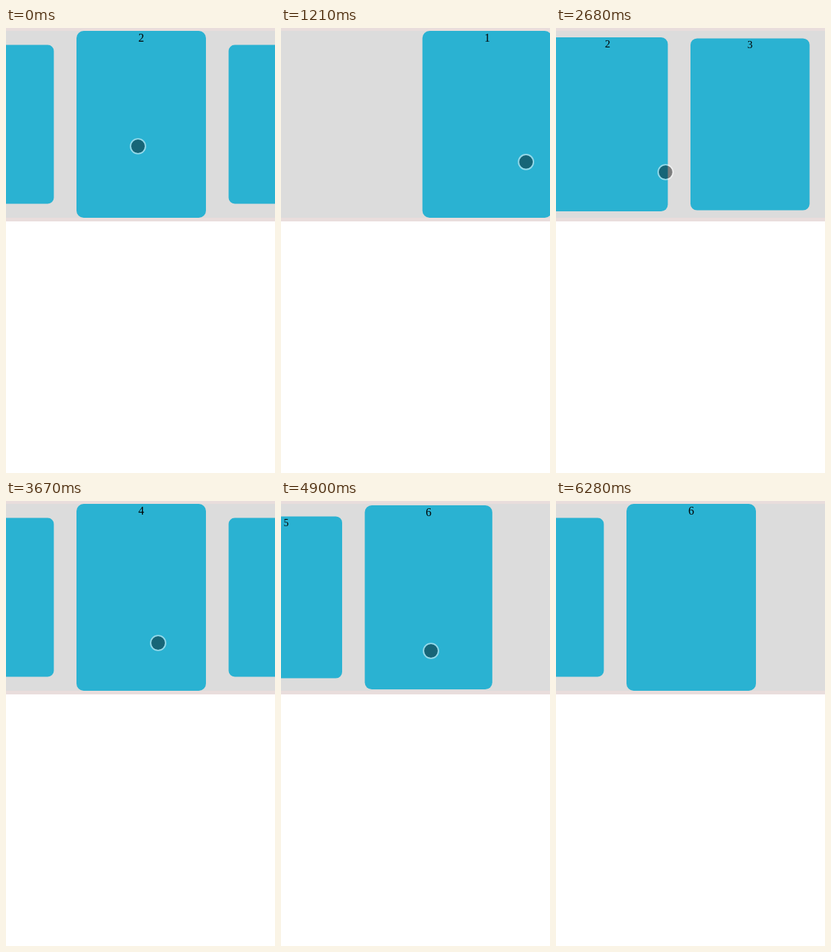
Recreate the animation shown at these times as an HTML page with a canvas. Size 374x619 px, loop 6980 ms.

```html
<!DOCTYPE html>
<html lang="en">
<head>
<meta charset="utf-8">
<title>Card carousel</title>
<style>
  html, body { margin: 0; width: 100%; height: 100%; overflow: hidden; background: #fff; }
  canvas { display: block; width: 374px; height: 619px; }
</style>
</head>
<body>
<canvas id="stage"></canvas>
<script>
const W = 374, H = 619, LOOP = 6980;
const CARD_W = 180, CARD_H = 260, GAP = 198, MID_X = 188, MID_Y = 134, CARDS = 6;
const SNAP = 350, GLIDE_DELAY = 230;
const FIRST_CARD = 2, START_Y = 164.5;
const EXIT = { time: 6280, x: 354, y: 634, bendY: 260 };

// Press time, drag duration, press x, drag distance, y at release
const swipes = [
  [370, 170, 183.5, 58.5, 177],
  [1070, 230, 242, 116, 188],
  [1840, 82, 210.5, -47, 198],
  [2450, 134, 197, -44.6, 200.5],
  [3260, 60, 258, -46.5, 197.5],
  [3980, 100, 211.5, -46, 200],
  [4620, 63, 235, -26.5, 208.5],
  [5350, 250, 238, -98, 228]
].map(([press, ms, x, dx, y]) => ({ press, ms, release: press + ms, x, dx, y }));

// Each swipe moves one card, and stops at either end of the row
let card = FIRST_CARD, lastY = START_Y;
for (const s of swipes) {
  s.from = card;
  s.to = card = Math.min(CARDS, Math.max(1, card - Math.sign(s.dx)));
  s.startY = lastY;
  lastY = s.y;
}

const canvas = document.getElementById('stage');
const ctx = canvas.getContext('2d');
const dpr = window.devicePixelRatio || 1;
canvas.width = W * dpr;
canvas.height = H * dpr;

const mix = (a, b, k) => a + (b - a) * k;
const clamp01 = k => Math.min(1, Math.max(0, k));
const easeOut = k => 1 - (1 - k) ** 2;
const smooth = k => k * k * (3 - 2 * k);
const bend = (a, b, c, k) => mix(mix(a, b, k), mix(b, c, k), k);

// cubic-bezier(.25, .1, .25, 1)
function ease(x) {
  if (x <= 0 || x >= 1) return clamp01(x);
  const curve = (u, a, b) => 3 * u * (1 - u) * (1 - u) * a + 3 * u * u * (1 - u) * b + u * u * u;
  let lo = 0, hi = 1;
  for (let i = 0; i < 20; i++) {
    const u = (lo + hi) / 2;
    if (curve(u, .25, .25) < x) lo = u; else hi = u;
  }
  return curve(lo, .1, 1);
}

function stateAt(t) {
  const i = Math.max(0, swipes.findLastIndex(s => s.press <= t));
  const s = swipes[i], next = swipes[i + 1];
  const pull = easeOut(clamp01((t - s.press) / s.ms));
  const snap = ease((t - s.release) / SNAP);
  let x = s.x + s.dx * pull;
  let y = mix(s.startY, s.y, pull);

  if (next) {
    // Glide to where the next swipe begins
    x = mix(x, next.x, smooth(clamp01((t - s.release - GLIDE_DELAY) / (SNAP - GLIDE_DELAY))));
  } else if (t > s.release) {
    const k = easeOut(clamp01((t - s.release) / (EXIT.time - s.release)));
    x = bend(x, EXIT.x, EXIT.x, k);
    y = bend(y, EXIT.bendY, EXIT.y, k);
  }
  return {
    x, y,
    pos: mix(s.from - s.dx * pull / GAP, s.to, snap),
    focus: mix(s.from, s.to, snap) // drives the scale, so drags leave it unchanged
  };
}

function drawCard(n, { pos, focus }) {
  const scale = 1 - .15 * Math.min(1, Math.abs(n - focus));
  ctx.save();
  ctx.translate(MID_X + (n - pos) * GAP, MID_Y);
  ctx.scale(scale, scale);
  ctx.fillStyle = '#2ab2d2';
  ctx.beginPath();
  ctx.roundRect(-CARD_W / 2, -CARD_H / 2, CARD_W, CARD_H, 10);
  ctx.fill();
  ctx.fillStyle = '#000';
  ctx.fillText(n, 0, 15 - CARD_H / 2);
  ctx.restore();
}

function drawPointer({ x, y }) {
  ctx.beginPath();
  ctx.arc(x, y, 9.5, 0, Math.PI * 2);
  ctx.fillStyle = 'rgba(0,0,0,.43)';
  ctx.fill();
  ctx.beginPath();
  ctx.arc(x, y, 10.4, 0, Math.PI * 2);
  ctx.strokeStyle = 'rgba(255,255,255,.5)';
  ctx.lineWidth = 1.9;
  ctx.stroke();
}

function band(color, y, h) {
  ctx.fillStyle = color;
  ctx.fillRect(0, y, W, h);
}

function draw(t) {
  const state = stateAt(t);
  ctx.setTransform(dpr, 0, 0, dpr, 0, 0);
  band('#fff', 0, H);
  band('#e9dddc', 0, 269);
  band('#dcdcdc', 4, CARD_H);
  ctx.font = '16px "Liberation Serif", "Noto Serif", serif';
  ctx.textAlign = 'center';
  for (let n = 1; n <= CARDS; n++) drawCard(n, state);
  if (t < EXIT.time) drawPointer(state);
}

const start = performance.now();
function tick() {
  draw((performance.now() - start) % LOOP);
  requestAnimationFrame(tick);
}
tick();
</script>
</body>
</html>
```
